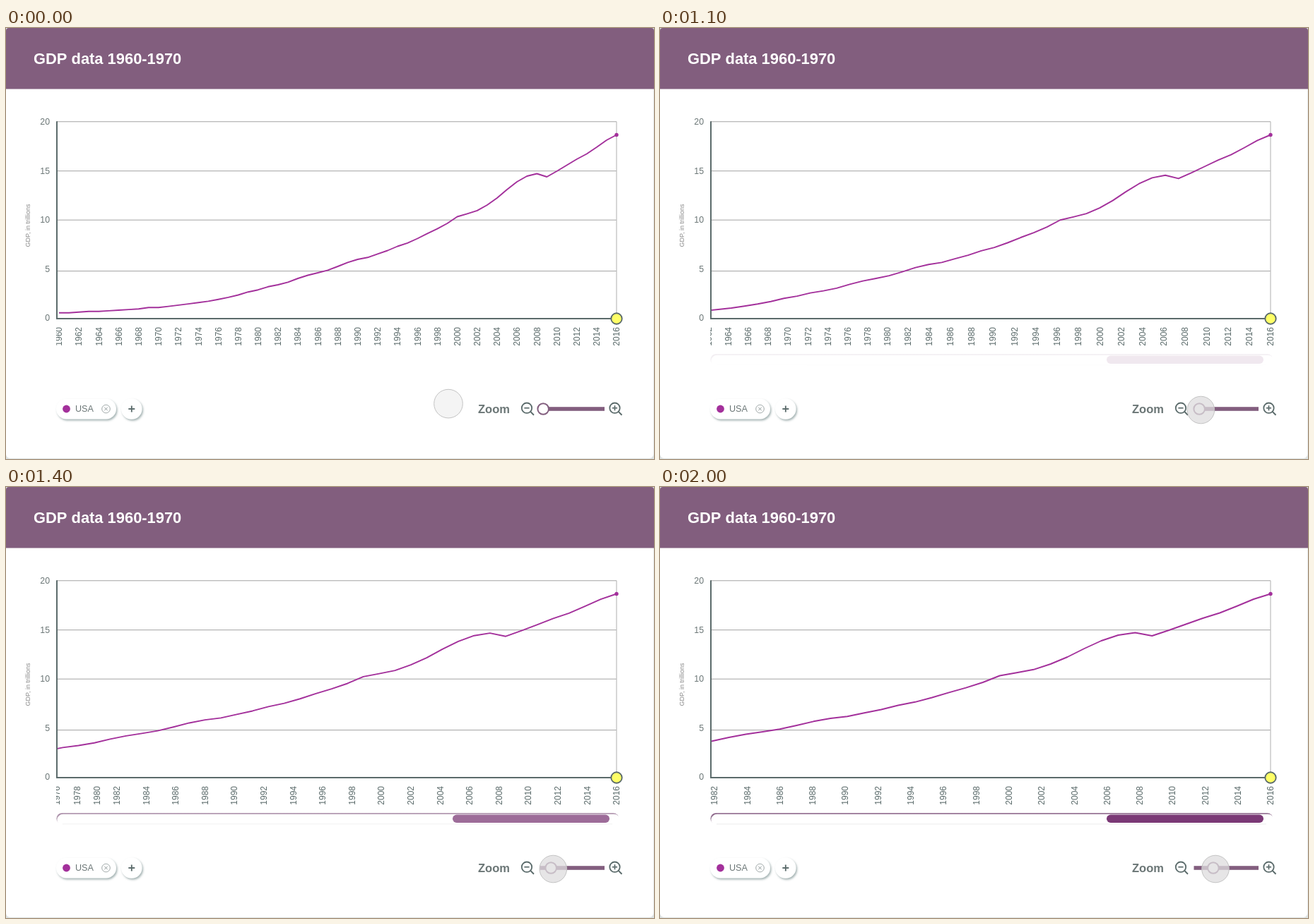
Recreate the animation shown at these times as an HTML page with a canvas. Size 917 by 611 pixels, loop 2.5 s.

```html
<!DOCTYPE html>
<html lang="en">
<head>
<meta charset="utf-8">
<title>GDP chart zoom</title>
<style>
html, body { margin: 0; width: 100%; height: 100%; overflow: hidden; background: #fff; }
canvas { display: block; width: 917px; height: 611px; }
</style>
</head>
<body>
<canvas id="stage" width="917" height="611"></canvas>
<script>
const ctx = document.getElementById('stage').getContext('2d');
const LOOP = 2500, STEP = 100;
const LEFT = 72, RIGHT = 864, BASE = 412, TOP = 132.8;
const YEAR_W = 14.09, LAST = 2016;
const SANS = '"Liberation Sans", Arial, sans-serif';
const PURPLE = '#825e7e', PINK = '#a3309b', SLATE = '#5b6b6b', TEXT = '#6b7676';

// Height of the curve for each year from 1960 to 2016.
const curve = [
  403.7, 403.7, 402.7, 401.8, 401.7, 400.9, 400, 399.1, 398.2, 396.3,
  396.3, 394.6, 392.9, 391.1, 389.3, 387.4, 384.7, 381.9, 378.5, 374.2,
  371.2, 366.8, 364, 360.3, 355, 350.5, 347, 343.3, 338, 332.3,
  328, 325.3, 320.3, 315.5, 309.5, 304.8, 298.5, 291.3, 284.6, 277,
  267.5, 263.3, 258.8, 251, 241, 229, 218, 210, 206.5, 211,
  203, 194.5, 186, 178.5, 169, 159, 151.5
];

const clamp = v => Math.max(0, Math.min(1, v));
const lerp = (a, b, p) => a + (b - a) * p;
const span = (t, start, length) => clamp((t - start) / length);

// Cubic bezier (.25, .1, .25, 1)
function ease(x) {
  if (x <= 0 || x >= 1) return clamp(x);
  let lo = 0, hi = 1, u = 0.5;
  for (let i = 0; i < 30; i++) {
    u = (lo + hi) / 2;
    const bx = 0.75 * u * (1 - u) + u * u * u;
    if (bx < x) lo = u; else hi = u;
  }
  return 0.3 * u * (1 - u) ** 2 + 3 * u * u * (1 - u) + u ** 3;
}

function rect(x, y, w, h, color) {
  ctx.fillStyle = color;
  ctx.fillRect(x, y, w, h);
}

function pill(x, y, w, h, r, color) {
  ctx.beginPath();
  ctx.roundRect(x, y, w, h, r);
  ctx.fillStyle = color;
  ctx.fill();
}

function disc(x, y, r, fill, stroke, width) {
  ctx.beginPath();
  ctx.arc(x, y, r, 0, Math.PI * 2);
  if (fill) { ctx.fillStyle = fill; ctx.fill(); }
  if (stroke) { ctx.strokeStyle = stroke; ctx.lineWidth = width; ctx.stroke(); }
}

function line(x1, y1, x2, y2, color, width) {
  ctx.beginPath();
  ctx.moveTo(x1, y1);
  ctx.lineTo(x2, y2);
  ctx.strokeStyle = color;
  ctx.lineWidth = width;
  ctx.stroke();
}

function text(str, x, y, size, color, align = 'left', weight = '') {
  ctx.font = `${weight} ${size}px ${SANS}`;
  ctx.fillStyle = color;
  ctx.textAlign = align;
  ctx.fillText(str, x, y);
}

function upText(str, x, y, size, color) {
  ctx.save();
  ctx.translate(x, y);
  ctx.rotate(-Math.PI / 2);
  text(str, 0, size * 0.36, size, color, 'center');
  ctx.restore();
}

function raised(x, y, w, h) {
  ctx.save();
  ctx.shadowColor = 'rgba(95,120,120,0.55)';
  ctx.shadowBlur = 3;
  ctx.shadowOffsetX = 1.5;
  ctx.shadowOffsetY = 2;
  pill(x, y, w, h, h / 2, '#fff');
  ctx.restore();
}

function card() {
  rect(0, 0, 917, 611, '#dde2e2');
  pill(0, 0, 916.3, 610, 6, '#fff');
  pill(0, 0, 917, 86.5, [4, 4, 0, 0], PURPLE);
  text('GDP data 1960-1970', 39, 51.3, 21.9, '#fff', 'left', 'bold');
}

function grid() {
  for (const y of [TOP, 202.7, 272.2, 344.6]) line(LEFT, y, RIGHT, y, '#a3a3a3', 1);
  line(RIGHT, TOP, RIGHT, BASE, '#bdbdbd', 1.2);
}

function plot(p) {
  // The zoomed curve begins in 1972 and grows out of the box of the full one.
  const zoomed = p > 0;
  const first = zoomed ? 1972 : 1960;
  const sx = zoomed ? lerp(1.2727, 1.7, p) : 1;
  const sy = zoomed ? lerp(1.046, 1, p) : 1;
  const end = curve[curve.length - 1];
  ctx.beginPath();
  for (let year = first; year <= LAST; year++) {
    const y = end + (curve[year - 1960] - end) * sy;
    ctx.lineTo(RIGHT - (LAST - year) * YEAR_W * sx, y);
  }
  ctx.strokeStyle = PINK;
  ctx.lineWidth = 1.9;
  ctx.lineJoin = 'round';
  ctx.stroke();
}

function years(p) {
  const pitch = YEAR_W * lerp(1, 1.643, p);
  for (let year = 1960; year <= LAST; year += 2) {
    const x = year < 1984
      ? RIGHT - (LAST - year) * YEAR_W - 308 * p
      : RIGHT - (LAST - year) * pitch;
    upText(year, x, 437.3, 12, SLATE);
  }
}

function axes() {
  line(LEFT, TOP - 0.5, LEFT, BASE + 1, SLATE, 2);
  line(LEFT - 1, BASE, RIGHT, BASE, SLATE, 2);
  [20, 15, 10, 5, 0].forEach((n, i) =>
    text(n, 62, 137.2 + i * 69.5, 12.3, TEXT, 'right'));
  upText('GDP, in trillions', 31, 280, 9, '#8a8a8a');
  disc(RIGHT, 151.5, 2.7, PINK);
  disc(RIGHT, BASE, 7.7, '#ffff66', SLATE, 1.9);
}

function scrollbar(alpha) {
  if (!alpha) return;
  ctx.save();
  ctx.globalAlpha = alpha;
  pill(632, 464.6, 222, 11.4, 5.7, '#7b3976');
  line(80, 477.8, 858, 477.8, '#ededed', 1);
  ctx.beginPath();
  ctx.roundRect(71.3, 462.2, 796, 16, 8);
  ctx.clip();
  const shade = ctx.createLinearGradient(0, 462, 0, 478);
  shade.addColorStop(0, '#82567f');
  shade.addColorStop(0.5, '#a78fa5');
  shade.addColorStop(1, '#e6e0e6');
  ctx.beginPath();
  ctx.rect(60, 455, 820, 30);
  ctx.roundRect(72.5, 463.8, 796, 16, 8);
  ctx.fillStyle = shade;
  ctx.fill('evenodd');
  ctx.restore();
}

function chips() {
  raised(71, 525.5, 85, 29);
  disc(85.5, 540, 5.4, PINK);
  text('USA', 98, 544.4, 12.6, TEXT);
  disc(141.5, 540, 5.8, null, '#a0a8a8', 1);
  line(139.2, 537.7, 143.8, 542.3, '#909a9a', 1);
  line(143.8, 537.7, 139.2, 542.3, '#909a9a', 1);
  raised(163, 525.2, 29.6, 29.6);
  line(173.3, 540, 182.3, 540, SLATE, 1.9);
  line(177.8, 535.5, 177.8, 544.5, SLATE, 1.9);
}

function lens(x, plus) {
  const y = 538.7;
  disc(x, y, 7.2, null, SLATE, 1.8);
  line(x + 5.2, y + 5.2, x + 10, y + 10, SLATE, 2);
  line(x - 3.6, y, x + 3.6, y, SLATE, 1.7);
  if (plus) line(x, y - 3.6, x, y + 3.6, SLATE, 1.7);
}

function slider(knob) {
  text('Zoom', 668, 545.5, 16.5, TEXT, 'left', 'bold');
  lens(737, false);
  lens(861.5, true);
  rect(755.5, 537.2, 91.5, 5.6, PURPLE);
  disc(knob, 540, 7.8, '#fff', PURPLE, 2);
}

function pointer(t, drag) {
  const press = span(t, 800, 200);
  const x = lerp(626, 760.6, ease(t / 720)) + drag + 2.7 * span(t, 900, 300);
  const y = lerp(532.6, 541.5, ease(t / 500));
  const tone = lerp(200, 222, press);
  const fill = `rgba(${tone},${tone - 2 * press},${tone},${lerp(0.2, 0.75, press)})`;
  disc(x, y, lerp(20.3, 19.3, press), fill, '#c3c3c3', 1);
}

function draw(t) {
  const p = ease(span(t, 1000, 900));
  const u = span(t, 1000, 1000);
  const drag = 22.7 * (1.35 * u - 0.35 * u * u);
  card();
  grid();
  plot(p);
  years(p);
  const edge = 4 - 6 * p;
  rect(edge, 100, 71 - edge, 355, '#fff');
  axes();
  scrollbar(p);
  chips();
  slider(760.2 + drag);
  pointer(t, drag);
}

const start = performance.now();
function tick() {
  const t = (performance.now() - start) % LOOP;
  draw(Math.min(2000, Math.floor(t / STEP) * STEP));
  requestAnimationFrame(tick);
}
tick();
</script>
</body>
</html>
```
